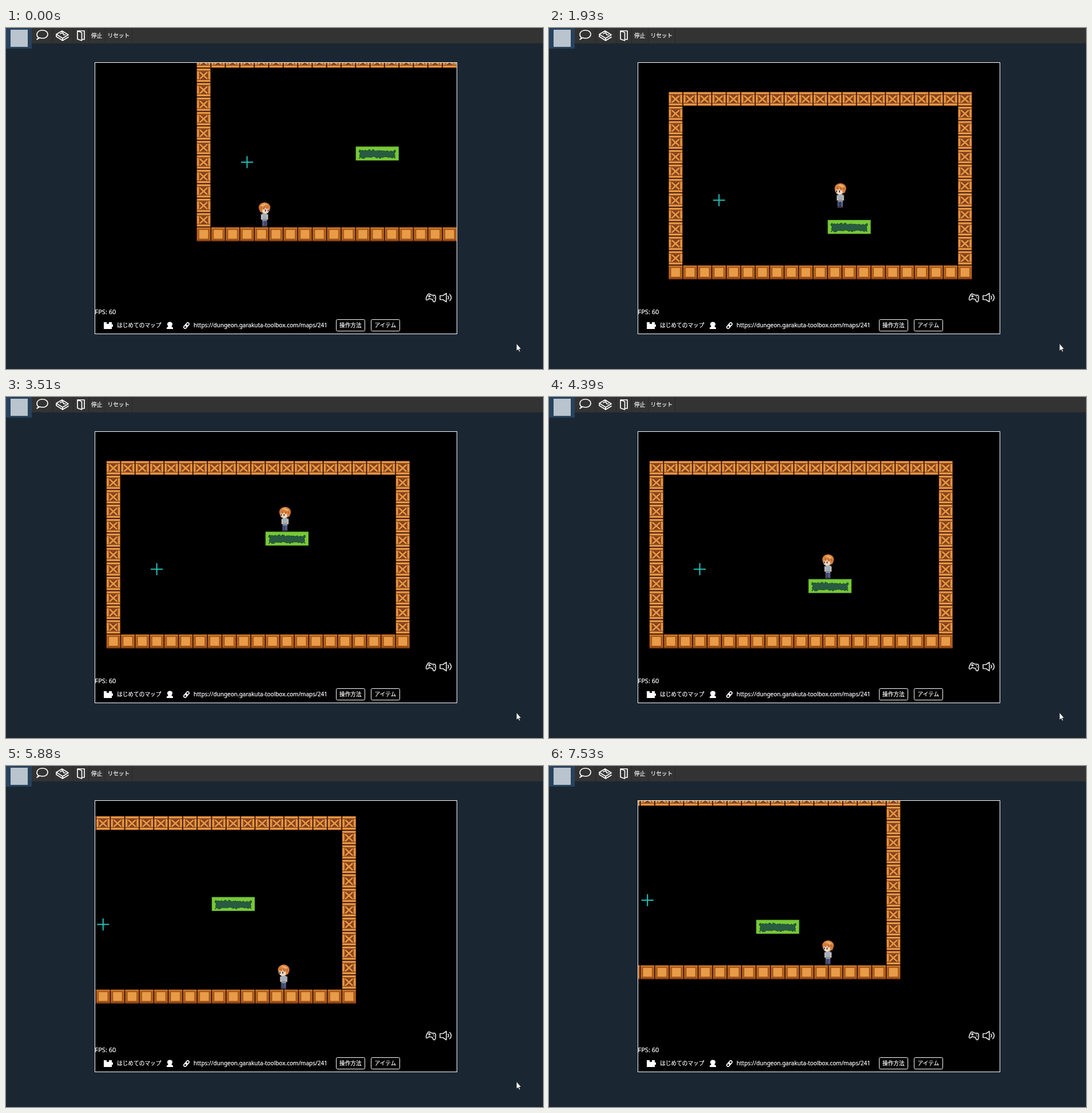
These frames come from a looping animation (939x597 px, 7.63 s). An HTML page with a canvas:

```html
<!DOCTYPE html>
<html lang="ja">
<head>
<meta charset="utf-8">
<title>はじめてのマップ</title>
<style>
  html, body { margin: 0; width: 100%; height: 100%; overflow: hidden; background: #1a2733; }
  #stage { position: relative; width: 939px; height: 597px; overflow: hidden; }
  canvas { position: absolute; left: 156px; top: 61px; background: #000; }
  svg { position: absolute; left: 0; top: 0; }
  text { font: 9.7px "Noto Sans CJK JP", "Noto Sans CJK", sans-serif; fill: #fff; stroke: #fff; stroke-width: .2; }
  .latin { font: 10px "Noto Sans", "Open Sans", sans-serif; }
  .fps { font-size: 11px; }
  .line { fill: none; stroke: #fff; stroke-width: 1.7; stroke-linejoin: round; stroke-linecap: round; }
  .soft { stroke: #ddd; }
</style>
</head>
<body>
<div id="stage">
  <canvas id="game" width="632" height="474"></canvas>
  <svg width="939" height="597" viewBox="0 0 939 597">
    <!-- toolbar -->
    <rect width="939" height="27" fill="#333"/>
    <path d="M81.5 0V27M117.5 0V27M144.5 0V27M173.5 0V27M220.5 0V27" stroke="#292929"/>
    <rect width="45" height="36" fill="#28425d"/>
    <rect x="8" y="3" width="30" height="30" fill="#b9c4ce"/>
    <path class="line" d="M57 17C52 13 53 4 64 4C76 4 76 18 64 18C62 18 60 17.500 59 17L54 20Z"/>
    <path class="line" d="M88 11L98 5L109 12L99 18ZM88 11V15L99 22L109 16M99 18V22M95 10L99 8L101 12L104 12"/>
    <path class="line" d="M125 5H137V20H133M125 5L132.500 8V22L125 19.500Z"/>
    <text x="149" y="16.600">停止</text>
    <text x="177.500" y="16.600">リセット</text>

    <!-- game window -->
    <rect x="155.500" y="60.500" width="633" height="475" fill="none" stroke="#fff"/>
    <g class="line soft" transform="translate(743.500 472) rotate(14)">
      <path d="M-4 -5.500Q0 -3.500 4 -5.500Q7 -6 8 0Q9 6 6.500 6Q5 6 3 2.500H-3Q-5 6 -6.500 6Q-9 6 -8 0Q-7 -6 -4 -5.500Z"/>
      <path d="M-5.500 -1.500H-2M-3.750 -3.200V.2M3 -2.500H3.100M5 -.5H5.100"/>
    </g>
    <path class="line soft" d="M759 468.500H764L770 464.500V479.500L764 475.500H759ZM773 469.500Q775 472 773 474.500M776 466.500Q781 472 776 477.500"/>
    <text class="latin fps" x="155.500" y="501">FPS: 60</text>
    <path d="M171 515H176V518H180V515H185V519H187V523H185V527H171Z" fill="#fff"/>
    <text x="194" y="523.600">はじめてのマップ</text>
    <path d="M281 527V524.500Q284 523 283.500 522Q281.500 520 282 517.500Q283 514.500 286.500 514.500Q290 514.500 291 517.500Q291.500 520 289.500 522Q289 523 292 524.500V527Z" fill="#fff"/>
    <g class="line" transform="translate(315.500 521) rotate(-50)">
      <rect x="-6" y="-2.300" width="7" height="4.600" rx="2.300"/>
      <rect x="-1" y="-2.300" width="7" height="4.600" rx="2.300"/>
    </g>
    <text class="latin" x="328" y="523.500">https://dungeon.garakuta-toolbox.com/maps/241</text>
    <g fill="#000" stroke="#fff">
      <rect x="577.500" y="510.500" width="50" height="20" rx="2"/>
      <rect x="638.500" y="510.500" width="50" height="20" rx="2"/>
    </g>
    <text x="583" y="523.600">操作方法</text>
    <text x="644.500" y="523.600">アイテム</text>
    <path id="cursor" d="M892.500 552.500V565.500L895.500 562.800L897.500 567L899.300 566.200L897.500 562H901Z" fill="#fff" stroke="#111" stroke-width=".7"/>
  </svg>
</div>
<script>
const LOOP = 7630, TILE = 25.3, COLS = 21, ROWS = 13;
const FLOOR = (ROWS - 1) * TILE;
const LAG = 200; // camera delay in ms
const ctx = document.getElementById('game').getContext('2d');
const cursor = document.getElementById('cursor');

const clamp = (v, lo, hi) => Math.min(hi, Math.max(lo, v));
const noise = i => Math.abs(Math.sin(i * 12.9898) * 43758.5453) % 1;

function snap(t) {
  const [start, gap] = t < 1930 ? [60, 85] : [1930, 87.5];
  return Math.max(0, start + Math.floor((t - start) / gap) * gap);
}

// Distance covered by walking from one time to another
const run = (t, from, to, speed) => speed * (clamp(t, from, to) - from);

const heroX = t => 119 + run(t, 486, 1250, .14) + run(t, 1250, 2040, .11)
  + run(t, 4567, 5409, .12) - run(t, 5550, 5870, .03);

// Phase of the lift at a few times: [time, radians]
const phases = [[0, -1.434], [1930, 3], [3510, 6.88], [5880, 11.556], [7530, 15.37]];

function liftY(t) {
  const i = clamp(phases.findIndex(p => p[0] > t), 1, phases.length - 1);
  const [t0, a] = phases[i - 1], [t1, b] = phases[i];
  return 170 - 55 * Math.cos(a + (b - a) * (t - t0) / (t1 - t0));
}

// Two jumps, each a parabola around its highest point
const JUMP_1 = { time: 1671, top: 163.6 }, JUMP_2 = { time: 5075, top: 72.3 };
const arc = (t, jump) => jump.top + 5.95e-4 * (t - jump.time) ** 2;

function heroY(t) {
  const first = arc(t, JUMP_1), second = arc(t, JUMP_2);
  if (t < JUMP_1.time) return Math.min(FLOOR, first);
  if (t < JUMP_2.time) return Math.min(liftY(t), first, second);
  return Math.min(FLOOR, second);
}

// Exponentially weighted average of the recent past
function lagged(f, t) {
  let sum = 0, total = 0;
  for (let d = 0; d < 1500; d += 10) {
    const w = Math.exp(-d / LAG);
    sum += w * f(t - d);
    total += w;
  }
  return sum / total;
}

const cameraX = t => Math.min(333, 488 - lagged(heroX, t));
const cameraY = t => Math.min(111.5, 348.5 - lagged(heroY, t));

function box(color, x, y, w, h) {
  ctx.fillStyle = color;
  ctx.fillRect(x, y, w, h);
}

function shape(color, points) {
  ctx.fillStyle = color;
  ctx.beginPath();
  for (let i = 0; i < points.length; i += 2) ctx.lineTo(points[i], points[i + 1]);
  ctx.fill();
}

function oval(color, x, y, rx, ry) {
  ctx.fillStyle = color;
  ctx.beginPath();
  ctx.ellipse(x, y, rx, ry, 0, 0, 7);
  ctx.fill();
}

function at(x, y, draw) {
  ctx.save();
  ctx.translate(x, y);
  draw();
  ctx.restore();
}

function cross(color, width) {
  ctx.strokeStyle = color;
  ctx.lineWidth = width;
  ctx.beginPath();
  ctx.moveTo(6, 7); ctx.lineTo(19, 19);
  ctx.moveTo(19, 7); ctx.lineTo(6, 19);
  ctx.stroke();
}

function crate() {
  box('#4b2018', .2, .2, 24.8, 24.9);
  box('#c97529', .8, .8, 23.6, 23.6);
  for (const y of [1.3, 20.8]) box('#e99c47', 1.3, y, 22.6, 2.8);
  for (const y of [4.4, 19.8]) box('#6a2f1a', .8, y, 23.6, .9);
  for (const x of [1.3, 20.9]) box('#e5953f', x, 5.6, 3, 14);
  box('#8a4522', 4.8, 5.5, 15.6, 14.2);
  cross('#5a2618', 4.6);
  cross('#e3943f', 3.1);
}

function block() {
  box('#54220f', .2, .2, 24.8, 24.9);
  box('#b9651d', .9, .9, 23.4, 23.4);
  box('#d17c2b', .9, .9, 23.4, 1.8);
  box('#8c4214', .9, 22.4, 23.4, 1.9);
  box('#7d3a12', 3.6, 3.6, 18, 18);
  box('#cc7a2b', 4.3, 4.3, 16.6, 16.6);
  box('#e89c48', 5.2, 5.2, 14.8, 14.8);
}

function room() {
  for (let r = 0; r < ROWS; r++)
    for (let c = 0; c < COLS; c++) {
      const floor = r === ROWS - 1;
      if (floor || r === 0 || c === 0 || c === COLS - 1)
        at(c * TILE, r * TILE, floor ? block : crate);
    }
}

// Ragged outline for the inside of the grass, inset by a margin
function ragged(inset) {
  const pts = [], w = 65 - 2 * inset;
  for (let i = 0; i <= 32; i++)
    pts.push(5 + inset + i * w / 32, 4.8 + inset + noise(i + 1) * 3.8);
  for (let i = 1; i < 6; i++) pts.push(70.5 - inset - noise(i + 40) * 3, 7 + i * 2.2);
  for (let i = 32; i >= 0; i--)
    pts.push(5 + inset + i * w / 32, 21.5 - inset - noise(i + 60) * 3.4);
  for (let i = 5; i > 0; i--) pts.push(4.5 + inset + noise(i + 100) * 3, 7 + i * 2.2);
  return pts;
}
const grassEdge = ragged(0), grassCore = ragged(1.2);

function grass() {
  box('#57a62b', 0, 0, 75.4, 24.6);
  box('#79c937', .8, 1, 73.8, 22.8);
  shape('#1f5427', grassEdge);
  shape('#285b42', grassCore);
}

function hero(step) {
  const dark = '#3b2c33';
  box(dark, -4.5, -12, 9.5, 12);
  box('#4e5f93', -3.6 - step, -12, 3.6, 10);
  box('#425180', .8 + step, -12, 3.4, 10);
  for (const x of [-3.8 - step, .8 + step]) box('#30303d', x, -2.5, 4, 2.3);
  box(dark, -6.8, -24, 13.6, 10.5);
  box('#a3afb8', -4, -24, 8, 13);
  box('#7d8b98', -4, -14, 8, 2);
  for (const x of [-6, 3.8]) {
    box('#b9c4ca', x, -22, 2.4, 6);
    box('#eebf98', x, -16, 2.4, 3);
  }

  oval('#6b3522', 0, -34, 10.6, 9.4);
  oval('#d57f3c', 0, -34.5, 9.8, 8.6);
  oval('#fbdcc0', 1.5, -29.5, 7, 6);
  shape('#d57f3c', [-9, -35, 9.5, -36, 9, -29, 7, -33, 5, -31, 2, -34, -1, -30, -3, -32, -4, -25, -8, -27]);
  shape('#efb06c', [-7, -38, 0, -41.5, 6, -39, 1, -38.5, -4, -35.5]);
  for (const x of [-6, -1, 4]) shape('#9c5028', [x - 1.5, -32, x + 2, -37, x, -32]);
  for (const x of [.8, 5.6]) box('#46303a', x, -30.8, 1.8, 3.6);
}

function marker() {
  box('#25c4bd', -10.5, -1, 21, 2);
  box('#25c4bd', -1, -10.5, 2, 21);
}

function render(t) {
  const x = heroX(t);
  const moving = Math.abs(heroX(t + 20) - x) > .8;
  const left = (t > 1850 && t < 4567) || t > 5550;
  ctx.clearRect(0, 0, 632, 474);
  at(cameraX(t) - 156, cameraY(t) - 61, () => {
    room();
    at(88.5, 190, marker);
    at(278.5, liftY(t), grass);
    at(x, heroY(t), () => {
      if (left) ctx.scale(-1, 1);
      hero(moving ? Math.sin(t / 70) * 1.3 : 0);
    });
  });
  // The pointer leaves through the bottom edge
  const exit = clamp((t - 6450) / 260, 0, 1);
  cursor.setAttribute('transform', `translate(${22 * exit} ${50 * exit})`);
}

function loop(now) {
  render(snap(now % LOOP));
  requestAnimationFrame(loop);
}
render(0);
requestAnimationFrame(loop);
</script>
</body>
</html>
```
